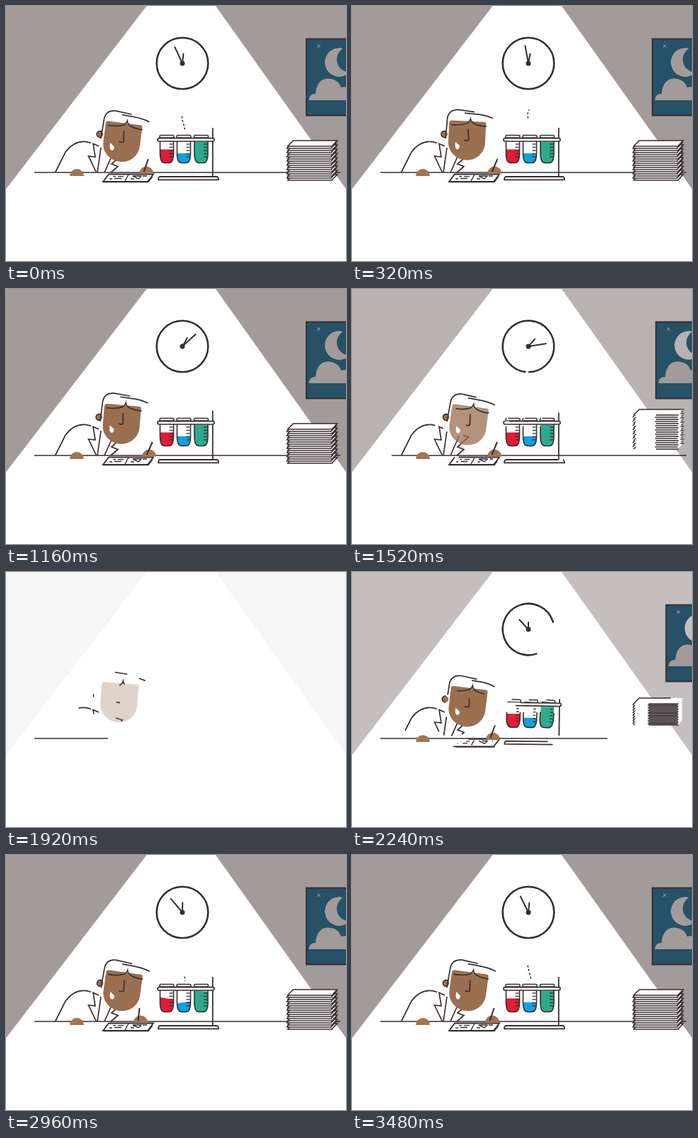
Animation of 480 by 360 pixels, one loop 3.52 s. Source, as an HTML page with a canvas:

```html
<!DOCTYPE html>
<html lang="en">
<head>
<meta charset="utf-8">
<title>Late night in the lab</title>
<style>
html, body { margin: 0; width: 100%; height: 100%; overflow: hidden; background: #fff; }
canvas { display: block; width: 480px; height: 360px; }
</style>
</head>
<body>
<canvas id="stage" width="480" height="360"></canvas>
<script>
const ctx = document.getElementById('stage').getContext('2d');
const LOOP = 3520, STEP = 40, SWITCH = 1800;
const INK = '#372d30', SKIN = '#9a6f50', HAND = '#a17550', WALL = '#a39b99', NIGHT = '#265167';
const FULL = [0, 1];
const rad = deg => deg * Math.PI / 180;
const clamp = v => Math.max(0, Math.min(1, v));
const mix = (a, b, k) => a + (b - a) * k;
const span = (t, start, length) => clamp((t - start) / length);
const easeOut = u => 1 - (1 - u) ** 2;

// [time, value] pairs joined by cosine easing
function track(keys, t) {
  if (t <= keys[0][0]) return keys[0][1];
  for (let i = 1; i < keys.length; i++) {
    const [t0, v0] = keys[i - 1], [t1, v1] = keys[i];
    if (t <= t1) return mix(v0, v1, (1 - Math.cos(Math.PI * (t - t0) / (t1 - t0))) / 2);
  }
  return keys[keys.length - 1][1];
}

const cache = {};
function shape(d) {
  if (!cache[d]) {
    const node = document.createElementNS('http://www.w3.org/2000/svg', 'path');
    node.setAttribute('d', d);
    cache[d] = { path: new Path2D(d), length: node.getTotalLength() };
  }
  return cache[d];
}

function line(d, [from, to] = FULL, width = 1.7) {
  if (to - from <= 0.001) return;
  const { path, length } = shape(d);
  const whole = from <= 0 && to >= 1;
  ctx.setLineDash(whole ? [] : [(to - from) * length, length * 2]);
  ctx.lineDashOffset = -from * length;
  ctx.lineWidth = width;
  ctx.strokeStyle = INK;
  ctx.stroke(path);
  ctx.setLineDash([]);
}

function fill(d, color, alpha = 1) {
  ctx.save();
  ctx.globalAlpha *= alpha;
  ctx.fillStyle = color;
  ctx.fill(shape(d).path);
  ctx.restore();
}

function group(x, y, deg, draw) {
  ctx.save();
  ctx.translate(x, y);
  ctx.rotate(rad(deg));
  draw();
  ctx.restore();
}

function disc(x, y, r, color, alpha = 1) {
  ctx.globalAlpha = alpha;
  ctx.fillStyle = color;
  ctx.beginPath();
  ctx.arc(x, y, r, 0, 7);
  ctx.fill();
  ctx.globalAlpha = 1;
}

function drawWall(s) {
  fill('M0 0H198.5L0 258.6Z', WALL, s.wall);
  fill('M296 0H480V258.3Z', WALL, s.wall);
  if (s.slide > 58) return;
  ctx.save();
  ctx.translate(s.slide, 0);
  fill('M424 46.5H500V154.5H424Z', NIGHT);
  disc(470.5, 79.5, 20, '#fff');
  disc(470.5, 79.5, 20, WALL, s.wall);
  disc(485, 75.5, 18, NIGHT);
  fill('M427.5 133Q428 124 437 124Q439 102.5 455 102.5Q469 103 473 115Q482 112 490 120V133Z', WALL);
  ctx.strokeStyle = '#b4babd';
  ctx.lineWidth = 1;
  ctx.stroke(shape('M439.5 54.5L443.5 58.5M443.5 54.5L439.5 58.5').path);
  line('M500 46.5H424V154.5H500', FULL, 1.8);
  ctx.restore();
}

function drawClock(s) {
  const start = s.entering ? mix(96, 180, s.grow) : 180 + 360 * s.clockTrim[0];
  const end = s.entering ? mix(96, 540, s.grow) : 540;
  if (end - start > 0.5) {
    ctx.strokeStyle = INK;
    ctx.lineWidth = 2.6;
    ctx.beginPath();
    ctx.arc(249, 81, 36.3, rad(start - 90), rad(end - 90));
    ctx.stroke();
  }
  group(249, 81, s.turn - 43, () => line('M0 0V-26', s.clockTrim, 2));
  group(249, 81, s.turn / 3, () => line('M0 0V-14.5', s.clockTrim, 2));
  if (s.solid > 0) disc(249, 81, 3.5 * s.solid, INK);
}

function drawBody(s) {
  line('M120 193.5Q100 186 84 206L69.5 235', s.bodyTrim);
  line('M131 198L123 194.5L126 213L116.5 212L127.5 235', s.bodyTrim);
  line('M134 200L129 235', s.lateTrim);
  line('M139 235L151 208', s.lateTrim);
  line('M155 206L164.5 209L149 223L158 226.5L148 235', s.bodyTrim);
}

function drawHead(s) {
  const k = s.tilt / 8, late = s.entering ? 1 - s.grow : 0;
  ctx.save();
  ctx.translate(mix(127, 131, k) - 5 * late, mix(181, 180.7, k) - 6 * late);
  ctx.rotate(rad(s.tilt - 4 * late));
  ctx.translate(-127, -181);
  if (s.solid > 0) disc(129, 181, 4.5 * s.solid, SKIN);
  line('M131 177A4.5 4.5 0 1 0 131 185', s.middleTrim, 1.5);
  fill('M139 161H184Q187 161 187 164V191A26 25 0 0 1 135 191V165Q135 161 139 161Z', SKIN, s.face);
  line('M170 147.5L147 145.5Q132.5 146 132 160L131 187', s.bodyTrim);
  line('M196 155Q186 151 171 150.5L156 149.8', s.bodyTrim);
  line('M138 167Q153 167.5 161 163.5Q164 161 164.8 157.5Q165.5 161 169 163.5Q178 167.5 188 167', s.middleTrim, 1.6);
  line('M157 188Q163.5 189 163.5 187L162 172', s.bodyTrim);
  fill('M145 191Q144 201.5 149 201.5Q152 199.5 151 195.5Q149 194.5 145 191Z', '#fff', s.solid);
  ctx.restore();
}

function drawNotebook(s) {
  ctx.save();
  ctx.translate(0, -4 * s.drop);
  fill('M145 237.5H208L200 248H137Z', '#fff', s.solid);
  line('M145 237.5H208L200 248H137Z', s.lateTrim, 1.8);
  line('M207 241L201 248.7H138', s.lateTrim, 1.2);
  line('M173 238L168 247', s.lateTrim, 1.4);
  line('M151 240.7H155M158 240.7H166M146 244H150M153 243.5H163', s.lateTrim, 1.3);
  line('M179 240H191L187 244L179 240M176 244H181M193 240H199', s.lateTrim, 1.4);
  ctx.restore();
}

function drawHands(s) {
  const palm = x => {
    ctx.beginPath();
    ctx.arc(x, 0, 10 * s.solid, Math.PI, 0);
    ctx.fillStyle = HAND;
    ctx.fill();
  };
  if (s.solid <= 0) return;
  group(100, 240, 0, () => palm(0));
  group(s.hand, 236.5, 0, () => {
    palm(0);
    ctx.strokeStyle = INK;
    ctx.lineWidth = 2;
    ctx.beginPath();
    ctx.moveTo(-3.5, -2.5);
    ctx.lineTo(-3.5 + (s.hand - 186) / 2 * s.solid, -2.5 - 18 * s.solid);
    ctx.stroke();
  });
}

const TUBE = 'M-9.5 5V22Q-9.5 35.5 -3 35.5H3Q9.5 35.5 9.5 22V5';
function drawTube(s, x, color, level, swing, slosh) {
  group(x, 186, swing * s.drop, () => {
    ctx.save();
    ctx.clip(shape(TUBE + 'Z').path);
    ctx.globalAlpha = s.solid;
    ctx.translate(0, level);
    ctx.rotate(rad(slosh * s.slosh - swing * s.drop));
    ctx.fillStyle = color;
    ctx.fillRect(-20, 0, 40, 50);
    ctx.restore();
    line(TUBE, s.lateTrim, 1.6);
    for (let y = 9; y < 30; y += 4.5) line(`M3.5 ${y}H8.5`, s.lateTrim, 1.3);
    line('M-8.5 -3.5H8.5Q10 -3.5 10 -2V0H-10V-2Q-10 -3.5 -8.5 -3.5Z', s.lateTrim, 1.5);
  });
}

function drawRack(s) {
  ctx.save();
  ctx.translate(258 + 2 * s.drop, 215 - 5 * s.drop);
  ctx.rotate(rad(2 * s.drop));
  ctx.translate(-258, -215);
  line('M291.8 172V241', s.lateTrim, 1.8);
  drawTube(s, 227, '#e31b35', 16.5, 1, 10);
  drawTube(s, 251, '#10a0df', 22, 4, -9);
  drawTube(s, 275.5, '#2bab8d', 6, 10, 5);
  const bar = 'M216 186.7H292.5Q294 186.7 294 188.8Q294 191 292 191H216Q214 191 214 188.8Q214 186.7 216 186.7Z';
  fill(bar, '#fff', s.solid);
  line(bar, s.lateTrim, 1.7);
  const base = 'M298 241H217Q215 242 215 245.3H300Q300 242 298 241Z';
  fill(base, '#fff', s.solid);
  line(base, s.lateTrim, 1.8);
  ctx.restore();
}

function drawTrail(s) {
  const d = 'M253 180C253 170 248.5 164 248 153C248 147 253 145 255 138';
  const { length } = shape(d), c = s.clock;
  if (c < 2800 || c > 4300) return;
  const head = Math.min(length, (c - 2580) * 0.0275);
  const tail = Math.max(2, 5 + (c - LOOP) * 0.0515);
  for (let p = 0; p < head; p += 5.5) {
    line(d, [Math.max(p, tail) / length, Math.min(p + 3, head) / length], 1.5);
  }
}

function drawPapers(s) {
  const last = 16;
  const rim = s.entering ? s.paperGrow : 1 - s.lift ** 3;
  const front = s.entering ? s.paperGrow : 1 - s.lift;
  if (rim <= 0) return;
  for (let k = last; k >= 0; k--) {
    const rise = s.entering ? s.stack * (10 + 15 * k / last) : 80 * s.lift ** 2;
    ctx.save();
    ctx.translate(k % 2 ? -0.7 : 0.5, 3 * k - rise);
    fill('M397 198L405 190H467L459.5 198Z', '#fff', s.solid);
    line('M397 198L405 190H467L459.5 198', [0, rim], 1.6);
    line('M460.5 198H396.5', [0, front], 1.6);
    ctx.restore();
  }
}

function stateAt(t) {
  const entering = t >= SWITCH;
  const clock = entering ? t : t + LOOP;
  const exit = span(t, 1400, 360);
  const gone = exit ** 3;
  const grow = easeOut(span(t, 1880, 700));
  const bodyGrow = easeOut(span(t, 1830, 700));
  const lateGrow = easeOut(span(t, 1920, 640));
  const fromMiddle = g => entering ? [0.5 - g / 2, 0.5 + g / 2] : [gone, 1];
  return {
    entering, clock, grow: lateGrow === 0 ? 0 : grow,
    bodyTrim: entering ? [0, bodyGrow] : [gone, 1],
    middleTrim: fromMiddle(bodyGrow),
    lateTrim: fromMiddle(lateGrow),
    clockTrim: entering ? [0, lateGrow] : [span(t, 1440, 320) ** 3, 1],
    table: entering ? [0, easeOut(span(t, 1807, 880))] : [gone, 1],
    wall: entering ? easeOut(span(t, 1880, 900)) : 1 - span(t, 1440, 340),
    slide: 60 * (entering ? (1 - span(t, 1920, 740)) ** 2 : exit ** 2.25),
    solid: entering ? easeOut(span(t, 1960, 320)) : 1 - span(t, 1540, 200),
    face: entering ? span(t, 1800, 400) : 1 - span(t, 1440, 320),
    turn: (4.53 * Math.max(0, (clock - 2580) / 1000)) ** 2,
    tilt: track([[3380, 8], [4160, 0], [4260, 0], [4980, 8]], clock),
    hand: track([[2480, 199], [2960, 190], [3440, 198], [4200, 204], [5040, 201]], clock),
    drop: Math.sin(Math.PI * span(t, 2160, 640)),
    stack: Math.min(1.2, (1 - span(t, 2160, 640)) * 2),
    paperGrow: easeOut(span(t, 2040, 480)),
    lift: span(t, 1320, 400),
    slosh: entering && t > 2300
      ? Math.cos((t - 2960) / 125) * Math.min(1.2, Math.exp((2960 - t) / 170)) : 0
  };
}

function render(t) {
  const s = stateAt(t);
  ctx.fillStyle = '#fff';
  ctx.fillRect(0, 0, 480, 360);
  drawWall(s);
  drawClock(s);
  line('M40 235H472', s.table, 1.5);
  drawBody(s);
  drawHead(s);
  drawRack(s);
  drawTrail(s);
  drawNotebook(s);
  drawHands(s);
  drawPapers(s);
}

const began = performance.now();
function tick() {
  const t = (performance.now() - began) % LOOP;
  render(Math.floor(t / STEP) * STEP);
  requestAnimationFrame(tick);
}
tick();
</script>
</body>
</html>
```
